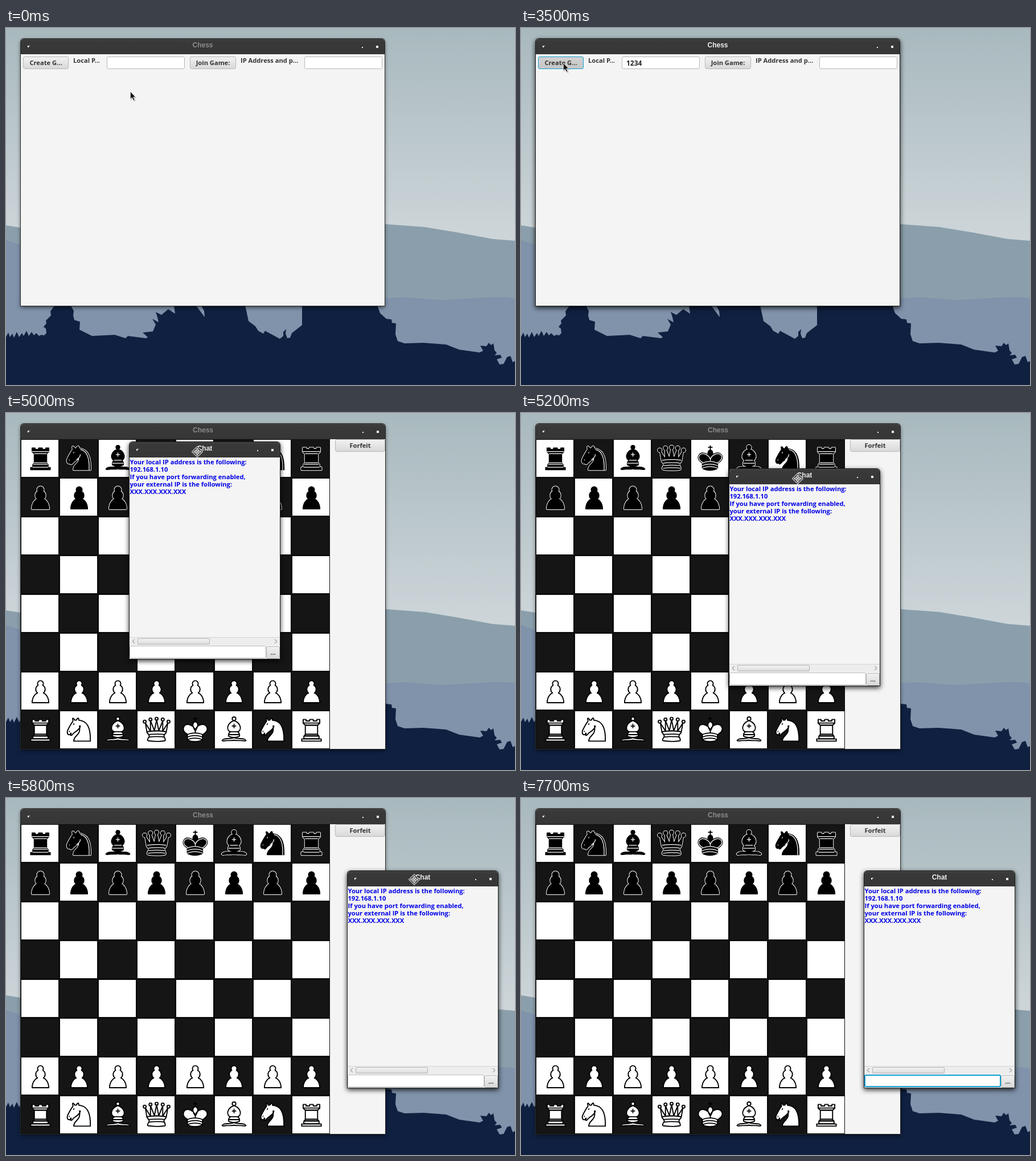
Animation, 894 px wide and 626 px high, one loop 8 s. Source, as an HTML page:

```html
<!DOCTYPE html>
<html lang="en">
<head>
<meta charset="utf-8">
<title>Chess</title>
<style>
  html, body { margin: 0; width: 100%; height: 100%; overflow: hidden; }
  body {
    --soft: 0 0 0 1px #2b2b2b, 0 3px 7px rgba(0, 0, 0, .6);
    --strong: 0 0 0 1px #1e1e1e, 0 3px 9px 1px rgba(0, 0, 0, .8);
    --face: linear-gradient(#f1f1f1, #d9d9d9);
    position: relative;
    background: linear-gradient(#a8b9be, #cdd5d9 365px);
    font: bold 11.15px/14px "Open Sans", sans-serif;
    color: #333;
  }
  body *, .close::after { position: absolute; box-sizing: border-box; white-space: pre; }
  svg * { position: static; }
  .scene { left: 0; top: 0; }

  /* every animation is a series of cuts on one shared clock */
  .cut { animation: 8s step-end infinite; }

  .win { background: #f4f4f4; border-radius: 5px 5px 0 0; box-shadow: var(--soft); color: #8b8b8b; }
  .bar {
    left: 0; top: 0; width: 100%; height: 27px; border-radius: 5px 5px 0 0;
    background: linear-gradient(#424242, #393939 4px, #363636);
    font: bold 12px/22px "Liberation Sans", Arial, sans-serif; text-align: center;
  }
  .bar i { background: #eee; }
  .menu { left: 12px; top: 12px; width: 2px; height: 3px; box-shadow: 2px -1px 0 -.5px #eee; }
  .min { right: 38px; top: 14px; width: 2px; height: 2px; }
  .max { right: 11px; top: 12px; width: 4px; height: 4px; }
  .btn, .field { height: 22px; border: 1px solid #b8b8b8; border-radius: 3px; }
  .btn { background: var(--face); color: #333; line-height: 20px; text-align: center; }
  .field { background: #fff; }
  .label { top: 31px; color: #333; }
  .ring { inset: -1px; border: 2px solid #109fd0; border-radius: 3px; opacity: 0; }

  #setup { left: 26px; top: 19px; width: 639px; height: 468px; animation-name: setup; }
  #game { left: 26px; top: 19px; width: 640px; height: 570px; animation-name: game; }
  #chat { left: 0; top: 0; width: 264px; height: 380px; color: #eee; box-shadow: var(--strong); animation-name: chat; }

  @keyframes setup {
    0% { opacity: 1; color: #8b8b8b; box-shadow: var(--soft); }
    16.25% { opacity: 1; color: #eee; box-shadow: var(--strong); }
    46.25%, 100% { opacity: 0; }
  }
  @keyframes game {
    0% { opacity: 0; }
    46.25% { opacity: 1; color: #eee; box-shadow: var(--strong); }
    47.5%, 100% { opacity: 1; color: #8b8b8b; box-shadow: var(--soft); }
  }
  @keyframes chat {
    0% { opacity: 0; transform: translate(213px, 49px); }
    47.5% { opacity: 1; transform: translate(213px, 49px); }
    62.5% { opacity: 1; transform: translate(217px, 51px); }
    63.75% { opacity: 1; transform: translate(285px, 75px); }
    65% { opacity: 1; transform: translate(366px, 98px); }
    66.25% { opacity: 1; transform: translate(442px, 109px); }
    67.5% { opacity: 1; transform: translate(502px, 116px); }
    68.75% { opacity: 1; transform: translate(544px, 120px); }
    70% { opacity: 1; transform: translate(571px, 124px); }
    71.25% { opacity: 1; transform: translate(590px, 127px); }
    72.5% { opacity: 1; transform: translate(600px, 128px); }
    73.75%, 100% { opacity: 1; transform: translate(603px, 128px); }
  }

  #create { animation-name: create; }
  @keyframes create {
    0% { background: var(--face); }
    40% { background: linear-gradient(#f6f6f6, #dfdfdf); }
    43.75%, 100% { background: linear-gradient(#d2d2d2, #c6c6c6); border-color: #109fd0; }
  }
  #portRing { animation-name: portRing; }
  @keyframes portRing { 0% { opacity: 0; } 16.25% { opacity: 1; } 43.75%, 100% { opacity: 0; } }
  #port {
    left: 7px; top: 4px; height: 13px; overflow: hidden; box-sizing: content-box;
    border-right: 1px solid transparent; color: #222; font-size: 12px; line-height: 13px;
    animation-name: port;
  }
  @keyframes port {
    0% { width: 0; border-color: transparent; }
    16.25% { width: 0; border-color: #222; }
    22.5% { width: 0; border-color: transparent; }
    25% { width: 1ch; border-color: #222; }
    27.5% { width: 2ch; border-color: #222; }
    30% { width: 3ch; border-color: #222; }
    35% { width: 4ch; border-color: #222; }
    43.75%, 100% { width: 4ch; border-color: transparent; }
  }

  .log { left: .5px; top: 27.5px; color: #0000e6; line-height: 13.2px; }
  .scroll { left: 0; top: 342px; width: 264px; height: 14px; background: #ededed; border-top: 1px solid #d4d4d4; }
  .scroll b { left: 14px; top: 1px; width: 127px; height: 11px; border: 1px solid #b4b4b4; border-radius: 2px; background: linear-gradient(#f3f3f3, #dcdcdc); }
  .scroll svg { left: 0; top: 0; fill: none; stroke: #777; }
  #chatRing { animation-name: chatRing; }
  @keyframes chatRing { 0%, 77.5%, 100% { opacity: 1; } 62.5% { opacity: 0; } }
  #chatCaret { left: 6px; top: 4px; width: 1px; height: 13px; background: #333; animation-name: chatCaret; }
  @keyframes chatCaret {
    0%, 60%, 77.5%, 90% { opacity: 1; }
    53.75%, 62.5%, 83.75%, 96.25%, 100% { opacity: 0; }
  }
  .close { left: 4px; top: 4px; width: 18px; height: 18px; border-radius: 1px; background: #dfdfdf; opacity: 0; animation-name: closeHover; }
  .close::after { content: ""; left: 8px; top: 9px; width: 2px; height: 2px; background: #444; box-shadow: 2px -2px 0 -.5px #444; }
  @keyframes closeHover { 0%, 82.5%, 100% { opacity: 0; } 81.25% { opacity: 1; } }

  #pointer { left: 0; top: 0; width: 1px; height: 1px; overflow: visible; animation-name: pointer; }
  @keyframes pointer {
    0% { transform: translate(218px, 111px); }
    3.75% { transform: translate(216px, 106px); }
    5% { transform: translate(211px, 92px); }
    6.25% { transform: translate(204px, 77px); }
    7.5% { transform: translate(198px, 66px); }
    8.75% { transform: translate(196px, 63px); }
    21.25% { transform: translate(199px, 67px); }
    22.5% { transform: translate(207px, 84px); }
    23.75% { transform: translate(217px, 103px); }
    25% { transform: translate(221px, 110px); }
    35% { transform: translate(214px, 113px); }
    36.25% { transform: translate(172px, 100px); }
    37.5% { transform: translate(122px, 84px); }
    38.75% { transform: translate(86px, 69px); }
    40% { transform: translate(74px, 61px); }
    52.5% { transform: translate(82px, 61px); }
    53.75% { transform: translate(108px, 62px); }
    55% { transform: translate(155px, 63px); }
    56.25% { transform: translate(215px, 64px); }
    57.5% { transform: translate(272px, 65px); }
    58.75% { transform: translate(314px, 65px); }
    60% { transform: translate(331px, 65px); }
    62.5% { transform: translate(336px, 68px); }
    63.75% { transform: translate(406px, 92px); }
    65% { transform: translate(486px, 115px); }
    66.25% { transform: translate(560px, 125px); }
    67.5% { transform: translate(618px, 132px); }
    68.75% { transform: translate(658px, 135px); }
    70% { transform: translate(687px, 139px); }
    71.25% { transform: translate(707px, 142px); }
    72.5% { transform: translate(717px, 143px); }
    73.75% { transform: translate(720px, 143px); }
    78.75% { transform: translate(703px, 143px); }
    80% { transform: translate(655px, 143px); }
    81.25% { transform: translate(594px, 141px); }
    82.5% { transform: translate(430px, 131px); }
    83.75% { transform: translate(250px, 120px); }
    85%, 100% { transform: translate(69px, 112px); }
  }
  #arrow { animation-name: arrow; }
  #beam { animation-name: beam; }
  #grab { animation-name: grab; }
  @keyframes arrow { 0%, 22.5%, 77.5% { opacity: 1; } 7.5%, 62.5%, 86.25%, 100% { opacity: 0; } }
  @keyframes beam { 0%, 22.5%, 100% { opacity: 0; } 7.5% { opacity: 1; } }
  @keyframes grab { 0%, 77.5%, 100% { opacity: 0; } 62.5% { opacity: 1; } }
</style>
</head>
<body>
<svg class="scene" width="894" height="626">
  <path fill="#8a9fab" d="M0 346 25 350 640 343 667 344 735 349 790 358 855 370 894 373V626H0z"/>
  <path fill="#8093ab" d="M0 372 25 380 640 476 667 474 700 472 765 477 850 472 880 472 894 474V626H0z"/>
  <g fill="#0f2040">
    <path d="M0 626V542l4-8 3 8 4-6 3 7 5-10 4 9 5-7 3 5 5-9 4 9 5-7 4 6 4-4 5 5 4-2 5 1 4-4-1-8-4-3 5-6-1-5 9-9-1-7 7-10h29l5 9-1 8 2 8 10 3-1 14 22 11 40-2 19 6 4-4 32 4V626z"/>
    <path d="M240 626 245 545 249 542 240 534 258 532 263 520 257 510 268 516 266 507 263 498 273 503 285 493 297 501 295 486H420L426 514 438 523 443 531 452 536 455 531 481 545 487 540 487 533 492 528 491 536 494 544 499 543 502 535 524 518 529 507 539 505 527 504 525 486 530 626z"/>
    <path d="M520 626V486H652L657 500 668 510 677 511 678 517 685 518 684 537 688 549 700 553 733 552 773 555 796 564 832 569 838 566 833 557 844 558 848 552 852 556 856 553 858 565 862 570 858 574 868 573 871 578 862 581 867 590 874 589 880 577 886 575 890 586 894 584V626z"/>
  </g>
  <path fill="#8093ab" d="M334 487 349 507 348 496 343 487z"/>
</svg>

<div id="setup" class="win cut">
  <div class="bar">Chess<i class="menu"></i><i class="min"></i><i class="max"></i></div>
  <div id="create" class="btn cut" style="left:4px;top:31px;width:80px">Create G...</div>
  <div class="label" style="left:92px">Local P...</div>
  <div class="field" style="left:151px;top:31px;width:137px">
    <div id="portRing" class="ring cut"></div><div id="port" class="cut">1234</div>
  </div>
  <div class="btn" style="left:297px;top:31px;width:81px">Join Game:</div>
  <div class="label" style="left:386px">IP Address and p...</div>
  <div class="field" style="left:498px;top:31px;width:137px"></div>
</div>

<div id="game" class="win cut">
  <div class="bar">Chess<i class="menu"></i><i class="min"></i><i class="max"></i></div>
  <svg id="board" width="543" height="543" style="left:0;top:27px"></svg>
  <div class="btn" style="left:552px;top:27px;width:88px">Forfeit</div>
</div>

<div id="chat" class="win cut">
  <div class="bar">Chat<i class="menu"></i><i class="min"></i><i class="max"></i></div>
  <div class="close cut"></div>
  <div class="log">Your local IP address is the following:
192.168.1.10
If you have port forwarding enabled,
your external IP is the following:
XXX.XXX.XXX.XXX</div>
  <div class="scroll"><b></b><svg width="264" height="13"><path d="M9 3 5 6.500 9 10M255 3l4 3.500-4 3.500"/></svg></div>
  <div class="field" style="left:0;top:357px;width:240px">
    <div id="chatRing" class="ring cut"></div><div id="chatCaret" class="cut"></div>
  </div>
  <div class="btn" style="left:240px;top:358px;width:24px">...</div>
</div>

<svg id="pointer" class="cut">
  <g id="arrow" class="cut">
    <path d="M1 2v14l3-3 3 5 3-1-2-5h4z" fill="#000" opacity=".2"/>
    <path d="M.3.3v13.400l3-2.700 2.500 5.300 2.300-1.100-2.400-5h4z" fill="#111" stroke="#fff" stroke-width=".8"/>
  </g>
  <g id="beam" class="cut" fill="none">
    <path d="M-3.500-7.500q3.500 0 3.500 2v11q0 2-3.500 2M3.500-7.500q-3.500 0-3.500 2v11q0 2 3.500 2" stroke="#111" stroke-width="1.300"/>
  </g>
  <g id="grab" class="cut" fill="none">
    <path d="M0-8 8 0 0 8-8 0z" stroke="#fff" stroke-width="3"/>
    <path d="M0-8 8 0 0 8-8 0z" fill="#fff" stroke="#222" stroke-width="1.200"/>
    <rect x="-4" y="-4" width="8" height="8" rx="2" stroke="#222"/>
    <circle r="2" stroke="#222"/>
  </g>
</svg>

<script>
const ball = (x, y, r) => `M${x - r} ${y}a${r} ${r} 0 1 0 ${2 * r} 0a${r} ${r} 0 1 0 ${-2 * r} 0z`;

// body: filled outline; lines: inner strokes; glow: light strokes on dark pieces only
const PIECES = {
  P: { body: 'M22.5 9c-2.2 0-4 1.800-4 4 0 .9.3 1.700.8 2.400C17.300 16.500 16 18.600 16 21c0 2 .9 3.800 2.400 5C15.400 27.100 11 31.600 11 39.500h23C34 31.600 29.600 27.100 26.600 26 28.100 24.800 29 23 29 21c0-2.400-1.300-4.500-3.300-5.600.5-.7.8-1.500.8-2.400 0-2.200-1.800-4-4-4z' },
  R: {
    body: 'M9 39h27v-3H9zM12 36v-4h21v4zM12.500 32l1.500-2.500h17l1.500 2.500zM14 29.500V17h17v12.500zM14 17l-3-3V9h4v2h5V9h5v2h5V9h4v5l-3 3z',
    lines: 'M12 35.700h21M13 31.700h19M14 29.500h17M14 16.800h17M11 14h23',
  },
  N: {
    body: 'M22 10c10.500 1 16.500 8 16 29H15c0-9 10-6.500 8-21M24 18c.4 2.900-5.500 7.400-8 9-3 2-2.800 4.300-5 4-1-.9 1.400-3 0-3-1 0 .2 1.200-1 2-1 0-4 1-4-4 0-2 6-12 6-12s1.900-1.900 2-3.500c-.7-1-.5-2-.5-3 1-1 3 2.500 3 2.500h2s.8-2 2.500-3c1 0 1 3 1 3',
    lines: 'M9 25.300v.4M14.800 15.800l.5-.9',
    glow: 'M24.500 11.200c8 1.500 12.500 9 11.800 28M24 18c.4 2.900-3 5.500-5 7',
  },
  B: {
    body: 'M9 36c3.400-1 10.100.4 13.500-2 3.400 2.400 10.100 1 13.500 2 0 0 1.600.5 3 2-.7 1-1.600 1-3 .5-3.400-1-10.100.5-13.500-1-3.400 1.500-10.100 0-13.500 1-1.400.5-2.300.5-3-.5 1.400-1.500 3-2 3-2zM15 32c2.500 2.500 12.500 2.500 15 0 .5-1.500 0-2 0-2 0-2.500-2.500-4-2.500-4 5.500-1.500 6-11.500-5-15.500-11 4-10.500 14-5 15.500 0 0-2.500 1.500-2.500 4 0 0-.5.5 0 2z' + ball(22.5, 8, 2.5),
    lines: 'M17.500 26h10M15 30h15M22.500 15.500v5M20 18h5',
  },
  Q: {
    body: 'M9 26c8.500-1.500 21-1.500 27 0l2-12-7 11V11l-5.500 13.500-3-15-3 15-5.500-14V25L7 14zM9 26c0 2 1.500 2 2.500 4 1 1.500 1 1 .5 3.500-1.500 1-1.500 2.500-1.500 2.500-1.500 1.500.5 2.500.5 2.500 6.500 1 16.500 1 23 0 0 0 1.500-1 0-2.500 0 0 .5-1.500-1-2.500-.5-2.500-.5-2 .5-3.500 1-2 2.500-2 2.500-4-8.500-1.500-18.500-1.500-27 0z'
      + ball(6, 12, 2) + ball(14, 9, 2) + ball(22.5, 8, 2) + ball(31, 9, 2) + ball(39, 12, 2),
    lines: 'M11.500 30c3.500-1 18.500-1 22 0M12 33.500c6-1 15-1 21 0',
    glow: 'M9.500 26c8.500-1.500 20-1.500 26 0M11 37c7-1 16-1 23 0',
  },
  K: {
    body: 'M22.500 11.600V6M20 8h5M22.500 25s4.500-7.500 3-10.500c0 0-1-2.500-3-2.500s-3 2.500-3 2.500c-1.500 3 3 10.500 3 10.500M11.500 37c5.500 3.500 15.500 3.500 21 0v-7s9-4.500 6-10.500c-4-6.500-13.500-3.500-16 4V27v-3.500c-3.500-7.500-13-10.500-16-4-3 6 5 10 5 10z',
    lines: 'M11.500 30c5.500-3 15.500-3 21 0M11.500 33.500c5.500-3 15.500-3 21 0M11.500 37c5.500-3 15.500-3 21 0',
    glow: 'M32 29.500s8.500-4 6-9.700C34.200 14 25 18 22.500 24.500v2-2C20 18 10.900 14 7 19.800c-2.500 5.700 4.900 9 4.900 9',
  },
};

const path = (d, stroke, width, fill = 'none') =>
  `<path d="${d}" stroke="${stroke}" stroke-width="${width}" fill="${fill}"/>`;

function drawPiece(kind, dark) {
  const { body, lines = '', glow = '' } = PIECES[kind];
  if (!dark) return path(body, '#000', 1.5, '#fff') + path(lines, '#000', 1.4);
  return path(body, '#fff', 3, '#fff') + path(body, '#000', 1.5, '#000') + path(lines + glow, '#fff', 1);
}

const RANKS = { 0: 'RNBQKBNR', 1: 'PPPPPPPP', 6: 'PPPPPPPP', 7: 'RNBQKBNR' };
let board = '<rect width="543" height="543" fill="#0d0d0d"/>';
for (let row = 0; row < 8; row++) {
  for (let col = 0; col < 8; col++) {
    const x = 1 + 68 * col, y = 1 + 68 * row;
    board += `<rect x="${x}" y="${y}" width="65" height="65" fill="${(row + col) % 2 ? '#151515' : '#fff'}"/>`;
    const kind = RANKS[row]?.[col];
    if (kind) board += `<g transform="translate(${x + 5} ${y + 3}) scale(1.267)">${drawPiece(kind, row < 2)}</g>`;
  }
}
document.getElementById('board').innerHTML =
  `<g stroke-linecap="round" stroke-linejoin="round">${board}</g>`;
</script>
</body>
</html>
```
